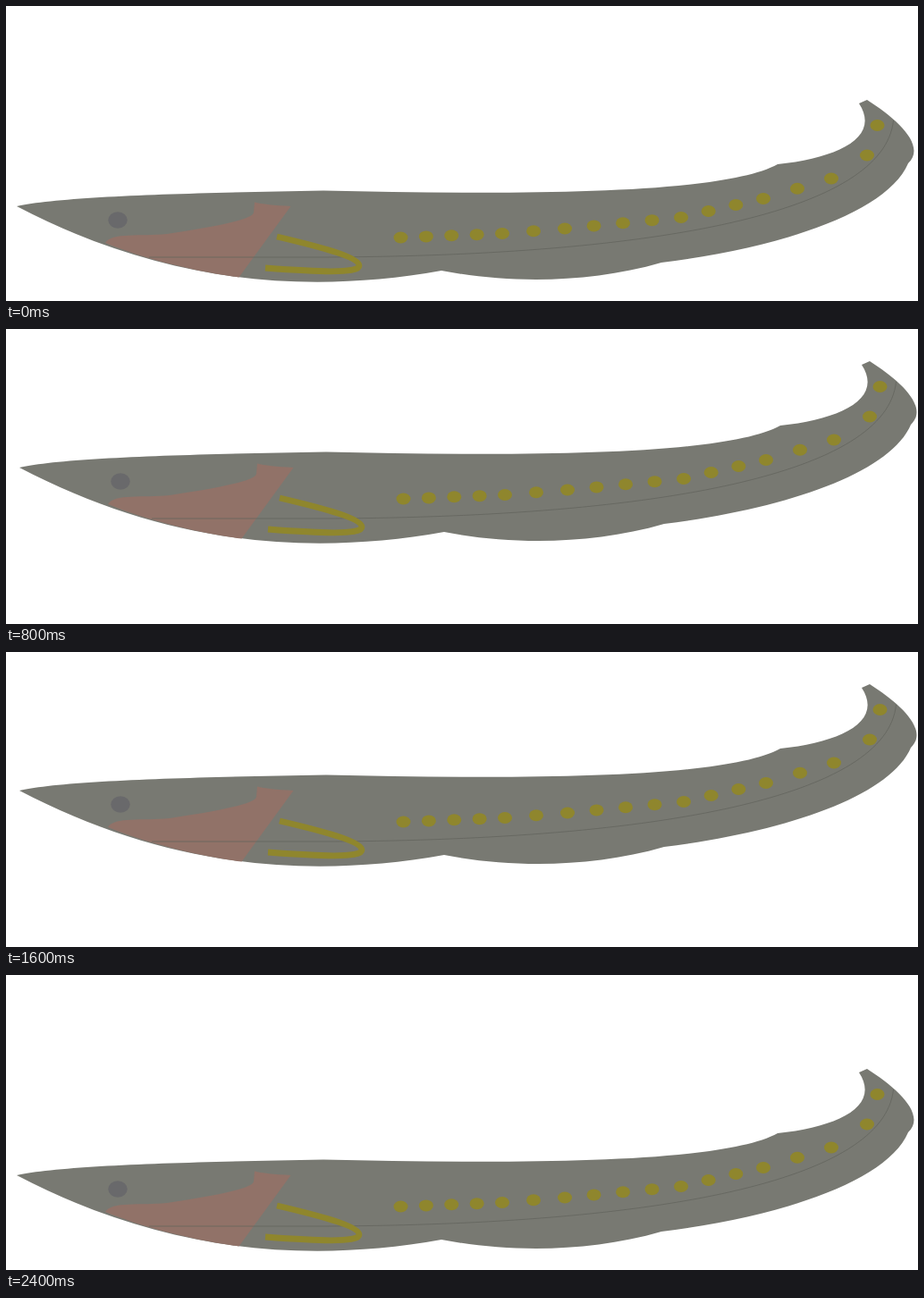
An HTML page for the animation above (2600 ms loop, 1020x330 px).

```html
<!DOCTYPE html>
<html lang="en">
<head>
<meta charset="utf-8">
<title>Swimming fish</title>
<style>
  html, body { margin: 0; width: 100%; height: 100%; overflow: hidden; background: #fff; }
  svg { display: block; width: 1020px; height: 330px; }
</style>
</head>
<body>
<svg viewBox="0 0 1020 330">
  <g id="fish">
    <path fill="#787972" d="M12 224 C60 213 200 209 355 206.5 C560 211 800 212 863 177
      C930 170 979 147 954 109 L963 105 C996 126 1030 156 1009 176
      C986 230 870 270 733 287 C650 311 560 310 487 296 C330 324 172 308 12 224Z"/>
    <path fill="#917268" d="M111 265 C118 253 150 258 180 255 C220 249 276 240 277 231
      L278 219.5 Q290 222.5 318.5 224 L260.5 303.5 C205 296 150 281 111 265Z"/>
    <path fill="none" stroke="#62635d" stroke-opacity=".75" d="M160 281 H360 C730 279 982 231 992.5 128"/>
    <path fill="none" stroke="#8f862d" stroke-width="6.8" d="M303 258 C350 269 395 281 395 290.5 S345 297 290 293"/>
    <ellipse cx="125" cy="239.5" rx="10.7" ry="9.2" fill="#69696b"/>
    <g id="spots" fill="#8f862d"></g>
  </g>
</svg>
<script>
const STEP = 200, STEPS = 13, PEAK = 6;
const RISE = 17.35, DRIFT = 0.65;

// Spots are spread evenly between the bends of the side line.
const bends = [
  { x: 441.5, y: 259 },
  { x: 555, y: 254.5, spots: 4 },
  { x: 625, y: 249, spots: 2 },
  { x: 755, y: 236.5, spots: 4 },
  { x: 847, y: 215.5, spots: 3 },
  { x: 923, y: 193, spots: 2 },
  { x: 963, y: 167, spots: 1 },
  { x: 974.5, y: 133.5, spots: 1 }
];
const mix = (a, b, t) => a + (b - a) * t;
const spot = (x, y) => `<ellipse cx="${x}" cy="${y}" rx="8" ry="6.5"/>`;

let spots = spot(bends[0].x, bends[0].y);
for (let i = 1; i < bends.length; i++) {
  const from = bends[i - 1], to = bends[i];
  for (let n = 1; n <= to.spots; n++) {
    const t = n / to.spots;
    spots += spot(mix(from.x, to.x, t), mix(from.y, to.y, t));
  }
}
document.getElementById("spots").innerHTML = spots;

const fish = document.getElementById("fish");

// The fish rises for six steps and sinks back for six.
function draw(ms) {
  const step = Math.floor(ms / STEP) % STEPS;
  const height = PEAK - Math.abs(step - PEAK);
  const x = Math.round(height * DRIFT), y = -Math.round(height * RISE);
  fish.setAttribute("transform", `translate(${x} ${y})`);
}

const start = performance.now();
function tick() {
  draw(performance.now() - start);
  requestAnimationFrame(tick);
}
tick();
</script>
</body>
</html>
```
